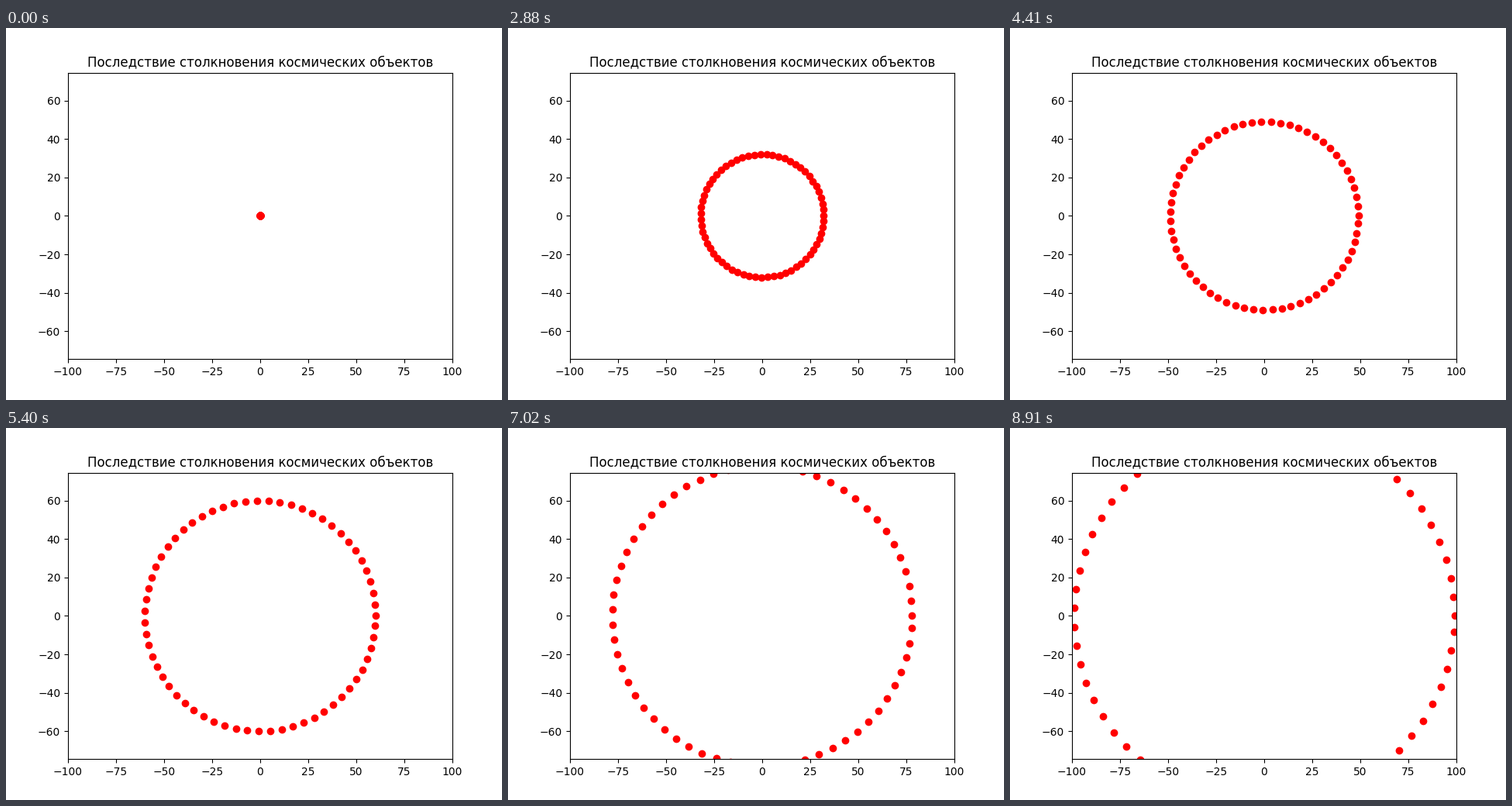
A matplotlib script that plays this animation: 640 px wide and 480 px high, repeating every 9 s.

```python
import numpy as np
import matplotlib.pyplot as plt
from matplotlib.animation import FuncAnimation

FRAMES = 100
INTERVAL = 90
X_LIMIT = 100

fig, ax = plt.subplots(figsize=(6.4, 4.8), dpi=100)
ax.set_title("Последствие столкновения космических объектов")

# Equal scale on both axes
box = ax.get_window_extent()
y_limit = X_LIMIT * box.height / box.width
ax.set_xlim(-X_LIMIT, X_LIMIT)
ax.set_ylim(-y_limit, y_limit)

angles = np.arange(0, 2 * np.pi, 0.1)
debris, = ax.plot([], [], "o", color="r")


def update(frame):
    """Fragments fly outwards at one unit per frame."""
    debris.set_data(frame * np.cos(angles), frame * np.sin(angles))
    return debris,


animation = FuncAnimation(fig, update, frames=FRAMES, interval=INTERVAL,
                          repeat=True, repeat_delay=0)
plt.show()
```
